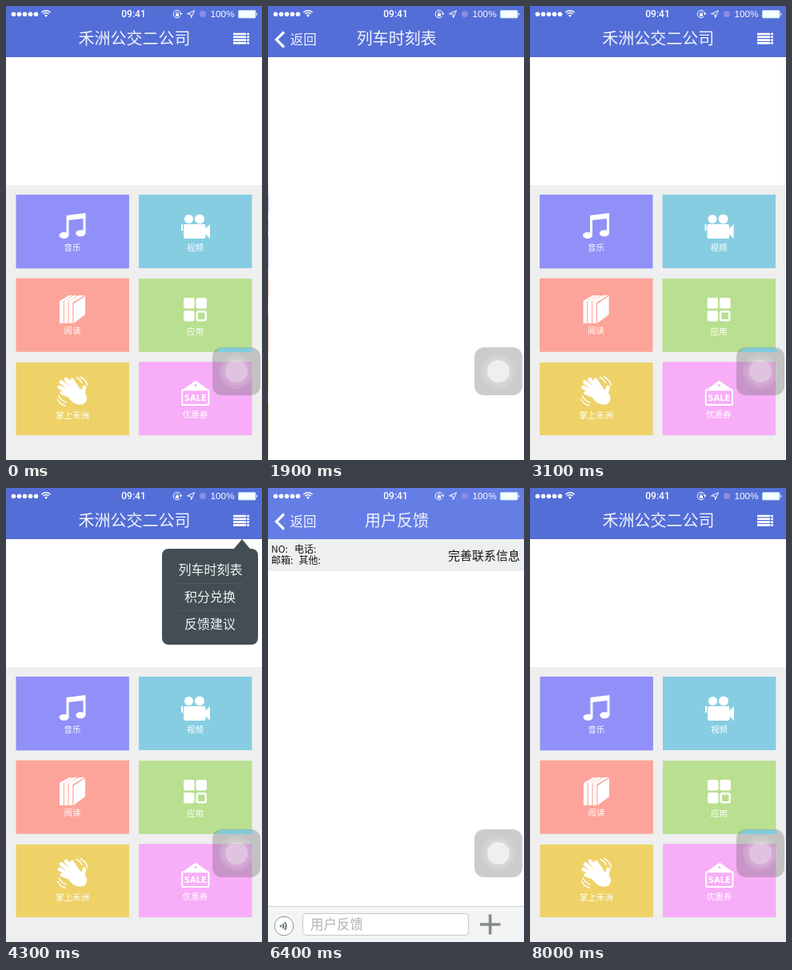
Recreate the animation shown at these times as an HTML page. Size 320 by 568 pixels, loop 8.1 s.

```html
<!DOCTYPE html>
<html lang="zh-CN">
<head>
<meta charset="utf-8">
<title>App navigation</title>
<style>
  html, body { margin: 0; width: 100%; height: 100%; overflow: hidden; background: #fff; }
  svg { display: block; width: 100%; height: 100%; }
  text { font-family: "Noto Sans CJK SC", "Noto Sans CJK", sans-serif; font-weight: 300; white-space: pre; }
  .white, .title, .label, .menu-item, .back { fill: #fff; }
  .line { fill: none; stroke: #fff; }
  .title { font-size: 20px; text-anchor: middle; fill-opacity: .92; }
  .back { font-size: 16.5px; fill-opacity: .92; }
  .label { font-size: 10.5px; text-anchor: middle; }
  .menu-item { font-size: 16px; text-anchor: middle; fill-opacity: .92; }
  .status { font: 500 12px Roboto, "Liberation Sans", sans-serif; fill: #fff; }
  .battery { font: 11.8px "Liberation Sans", sans-serif; }
  .small { font-size: 12px; }
  .sale { font: bold 10px "DejaVu Sans", sans-serif; text-anchor: middle; }
</style>
</head>
<body>
<svg viewBox="0 0 320 568" preserveAspectRatio="none">
  <g id="home">
    <path d="M0 64H320V568H0z" fill="#fff"/>
    <path d="M0 224H320V568H0z" fill="#eeefee"/>
    <g id="tiles"></g>

    <g class="white">
      <path d="M75.5 262 99.5 259V284.5H96.5V266L78.5 268V287H75.5z"/>
      <ellipse cx="72.5" cy="287" rx="6" ry="4"/>
      <ellipse cx="93.3" cy="284.3" rx="6" ry="4"/>
    </g>

    <g class="white">
      <circle cx="228.5" cy="266.5" r="5.5"/>
      <circle cx="242" cy="266.5" r="6"/>
      <rect x="222" y="273" width="27.5" height="18" rx="2"/>
      <path d="M249 279 255 273V291L249 285zM219 273H221V281H219z"/>
    </g>

    <g class="white">
      <path id="book" d="M67 369 79 362H83.5L71.7 369.5V397H67z"/>
      <use href="#book" x="5.8"/>
      <path d="M78.6 369 91 362H98.5L83.3 371V397H78.6z"/>
      <path d="M84.5 372.5 99 363V386L84.5 397z"/>
    </g>

    <g class="white">
      <rect x="222" y="365" width="13.5" height="13.5" rx="2.5"/>
      <rect x="237.5" y="365" width="13.5" height="13.5" rx="2.5"/>
      <rect x="222" y="381" width="13.5" height="13.5" rx="2.5"/>
      <rect class="line" x="238.7" y="382.2" width="11" height="11" rx="2" stroke-width="2.4"/>
    </g>

    <g class="line" stroke-linecap="round">
      <path d="M86 487 67 477M86 484 69 470.5M88 481 75 467M91 481 82.5 468M95 488 98 477M86 490 70 484" stroke-width="4.8"/>
      <path d="M88 464.5Q93 467 95 471.5M93 464Q100 467.5 101.5 474M66 488Q69 494 75 496M64.5 492Q67.5 498.5 74 500" stroke-width="1.5"/>
    </g>
    <ellipse class="white" cx="89" cy="488" rx="13" ry="9.5" transform="rotate(35 89 488)"/>

    <path class="white" d="M221 480 237 468.5 253 480z"/>
    <circle cx="237" cy="474.5" r="1.5" fill="#f8adf8"/>
    <rect class="line" x="220.2" y="480.2" width="33.2" height="18.8" rx="1.5" stroke-width="2"/>
    <text class="sale" x="236.8" y="493.6" fill="#fff">SALE</text>
  </g>

  <path id="dim" d="M0 64H320V568H0z"/>

  <g id="timetable">
    <path d="M-1 64H0V568H-1z" opacity=".08"/>
    <path d="M0 64H320V568H0z" fill="#fff"/>
  </g>

  <g id="feedback">
    <path d="M-1 64H0V568H-1z" opacity=".08"/>
    <path d="M0 64H320V568H0z" fill="#fff"/>
    <path d="M0 64H320V104H0z" fill="#eef0ef"/>
    <g fill-opacity=".92">
      <text class="small" x="4" y="81">NO:<tspan x="33">电话:</tspan></text>
      <text class="small" x="4" y="95">邮箱:<tspan x="38.5">其他:</tspan></text>
      <text x="225" y="89.5" font-size="15">完善联系信息</text>
    </g>
    <path d="M0 523H320V568H0z" fill="#f3f5f4"/>
    <path d="M0 523.5H320" stroke="#cfd1d0"/>
    <g fill="none" stroke="#6f7878">
      <circle cx="20" cy="548" r="11.8" fill="#fff" stroke="#8f9696"/>
      <path d="M18.5 545Q20.5 548 18.5 551M21 543Q24.5 548 21 553" stroke-width="2"/>
    </g>
    <circle cx="16" cy="548" r="1.5" fill="#6f7878"/>
    <rect x="43.5" y="532.5" width="207" height="27" rx="4" fill="#fff" stroke="#c6c8c7"/>
    <text x="53" y="552.3" font-size="16.5" fill="#b0b0b0">用户反馈</text>
    <path d="M265 546H290.5M277.7 533.5V558.5" stroke="#858a8c" stroke-width="3.6"/>
  </g>

  <path d="M0 0H320V64H0z" fill="#536ed7"/>
  <path id="tint" d="M0 0H320V64H0z" fill="#647ee6"/>

  <g class="white">
    <g id="dots"></g>
    <path d="M48 11.6Q50 9.8 52 11.6L50 14z"/>
    <path class="line" d="M46.3 10Q50 6.8 53.7 10M44.3 8Q50 3.4 55.7 8" stroke-width="1.4"/>
    <text class="status" x="159.5" y="14.4" text-anchor="middle">09:41</text>
    <path class="line" d="M217.8 12.6A4.7 4.7 0 1 1 218.5 9.2"/>
    <path d="M217 9H220.5L218.7 11.6zM212 9.5H216V12.8H212z"/>
    <path class="line" d="M212.7 9.5V8.4Q214 6.4 215.3 8.4V9.5" stroke-width=".8"/>
    <path class="line" d="M226.5 9.8 235.5 5.8 231.6 14.6 231 10.3z"/>
    <circle cx="246" cy="10" r="4" fill="#8d8be4"/>
    <text class="battery" x="255.5" y="14.4">100%</text>
    <rect x="290.5" y="5.5" width="21.5" height="9.5" rx="1.2" fill="#f4ffff" stroke="#b5dff2" stroke-width=".8"/>
    <path d="M313 8.3Q315.5 10.2 313 12.2z"/>
  </g>

  <g id="homeBar">
    <text class="title" id="homeTitle" x="160.5" y="48.4">禾洲公交二公司</text>
    <path class="line" d="M284 35H304M284 38.8H304M284 42.6H304M284 46.4H304" stroke-width="2.6" stroke-dasharray="16.2 1 3"/>
  </g>
  <text class="title" id="timetableTitle" x="160.5" y="48.4">列车时刻表</text>
  <text class="title" id="feedbackTitle" x="161" y="48.4">用户反馈</text>
  <g id="backBar">
    <path class="line" d="M20 32.5 10.5 42 20 51.5" stroke-width="3.2"/>
    <text class="back" id="backLabel" x="27.5" y="48.3">返回</text>
  </g>

  <g id="menu">
    <rect x="195" y="76" width="120" height="120" rx="8" fill="#434e54"/>
    <path d="M284.5 76.5 295 64 305.5 76.5z" fill="#434e54"/>
    <path d="M215 119.5H295M215 153.5H295" stroke="#525d63"/>
    <text class="menu-item" x="255.5" y="108">列车时刻表</text>
    <text class="menu-item" x="255" y="142">积分兑换</text>
    <text class="menu-item" x="255" y="176">反馈建议</text>
  </g>

  <rect x="258" y="427" width="60" height="60" rx="12" fill="#646464" fill-opacity=".33"/>
  <path id="strip" d="M263 433Q265 427.5 270 427.5H306L310 433z" fill="#82cbdc"/>
  <g class="white">
    <circle cx="288" cy="457" r="22" opacity=".1"/>
    <circle cx="288" cy="457" r="18" opacity=".1"/>
    <circle id="knob" cx="288" cy="457" r="14"/>
  </g>
</svg>

<script>
const LOOP = 8100, STEP = 100, WIDTH = 320;
const $ = id => document.getElementById(id);
const clamp = v => Math.min(1, Math.max(0, v));

$('tiles').innerHTML = [
  ['音乐', '#9090f8', 12.5, 236, 92.3],
  ['视频', '#86cde2', 166, 236, 92],
  ['阅读', '#fda49a', 12.5, 340.7, 92],
  ['应用', '#b9df90', 166, 341.2, 91.6],
  ['掌上禾洲', '#eed268', 12.5, 446, 91],
  ['优惠券', '#f8adf8', 166, 445.2, 91.8]
].map(([name, color, x, y, height]) =>
  `<rect x="${x}" y="${y}" width="141.4" height="${height}" fill="${color}"/>
   <text class="label" x="${x + 70.5}" y="${y + 69.5}">${name}</text>`).join('');

$('dots').innerHTML = [0, 1, 2, 3, 4].map(i =>
  `<circle cx="${9.5 + i * 7}" cy="10.2" r="2.8"/>`).join('');

// Critically damped spring, t in ms
const spring = t => {
  const x = 0.014 * Math.max(0, t);
  return 1 - (1 + x) * Math.exp(-x);
};

// 0 while the page is away, 1 when it covers the home screen
function pageProgress(t, push, pop) {
  const p = t < pop ? spring(t - push) : 1 - spring(t - pop);
  return p < 0.001 ? 0 : p > 0.999 ? 1 : p;
}

const fade = (t, from, to) => clamp((t - from) / 100) * clamp(1 - (t - to) / 100);

function slide(id, x) {
  $(id).setAttribute('transform', `translate(${x} 0)`);
}

function show(id, opacity) {
  $(id).setAttribute('opacity', clamp(opacity));
}

// The extra 2 px keep the edge shadow off stage while the page is away
function placePage(id, p) {
  slide(id, WIDTH * (1 - p) + (p ? 0 : 2));
}

function placeTitle(id, p, travel) {
  show(id, p);
  slide(id, travel * (1 - p));
}

function draw(t) {
  const timetable = pageProgress(t, 1280, 2560);
  const feedback = pageProgress(t, 5100, 6450);
  const p = Math.max(timetable, feedback);

  slide('home', -96 * p);
  show('dim', 0.08 * p);
  placePage('timetable', timetable);
  placePage('feedback', feedback);

  show('tint', feedback);
  show('homeBar', 1.2 * (1 - p));
  slide('homeTitle', -64 * p);
  placeTitle('timetableTitle', timetable, 209);
  placeTitle('feedbackTitle', feedback, 199);
  show('backBar', p ** 16);
  slide('backLabel', 104 * (1 - p));

  show('menu', fade(t, 250, 1250) + fade(t, 4150, 5100));
  show('strip', 1 - 2 * p);
  show('knob', 0.3 + 0.3 * p);
}

// The screen refreshes ten times a second; the small lead absorbs load delay
function tick() {
  const steps = Math.floor((performance.now() + 20) / STEP);
  draw((steps * STEP) % LOOP);
  requestAnimationFrame(tick);
}
tick();
</script>
</body>
</html>
```
